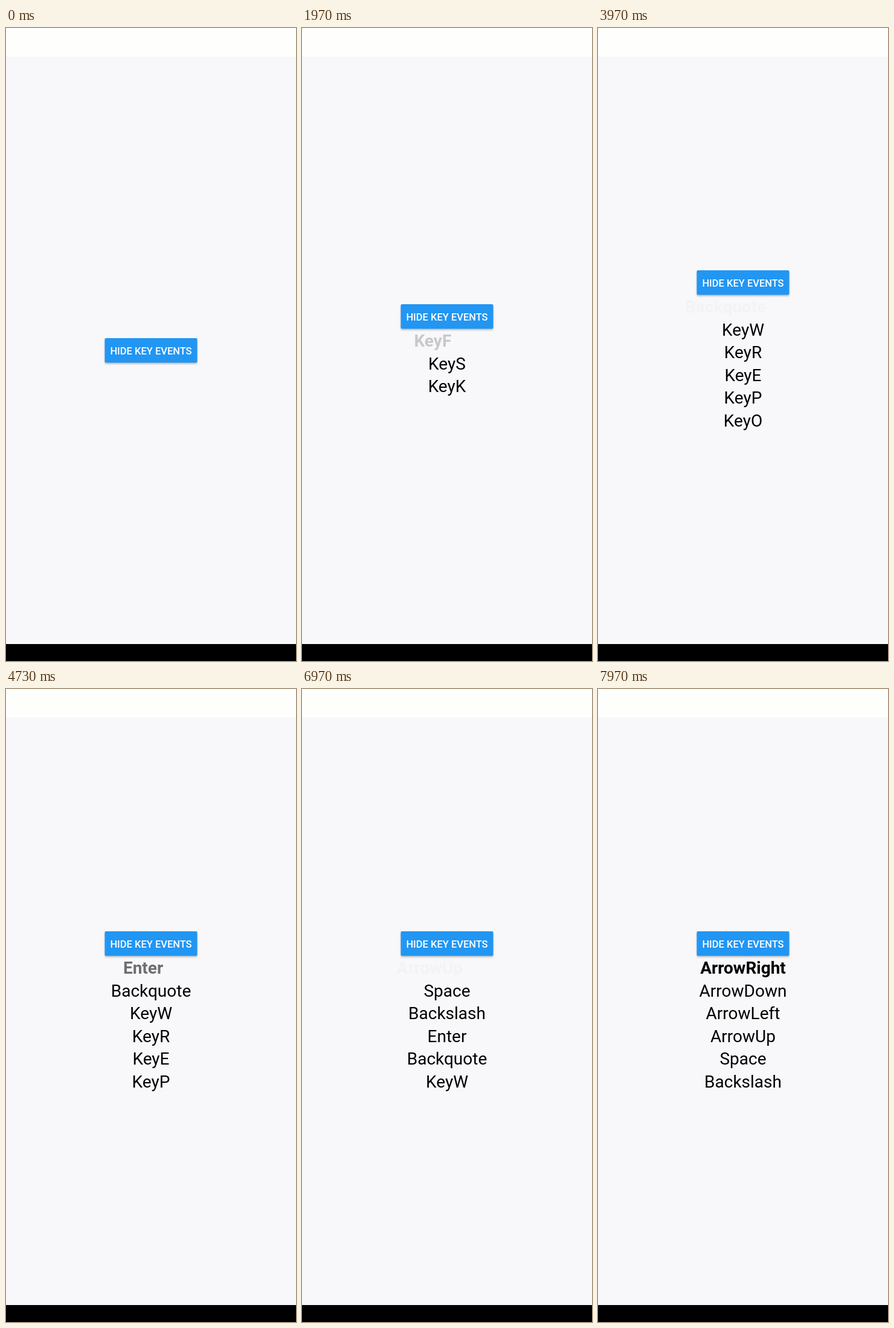
Write an HTML page that moves like this. It is 480 by 1045 pixels and loops after 8.5 s.

```html
<!DOCTYPE html>
<html lang="en">
<head>
<meta charset="utf-8">
<title>Key events</title>
<style>
  html, body { margin: 0; width: 100%; height: 100%; overflow: hidden; background: #f8f8fb; }
  svg { display: block; }
  text { font: 28px Roboto, sans-serif; text-anchor: middle; }
  #button rect { fill: #2196f3; filter: drop-shadow(0 2px 1.5px rgba(0, 0, 0, .26)); }
  #button text { font-size: 16.5px; font-weight: 500; fill: #fff; }
  #rows text:first-child { font-weight: 700; }
</style>
</head>
<body>
<svg width="480" height="1045" viewBox="0 0 480 1045">
  <rect width="480" height="1045" fill="#f8f8fb"/>
  <rect width="480" height="47" fill="#fefefd"/>
  <rect y="1017" width="480" height="28"/>
  <g id="button">
    <rect x="163.5" width="153" height="40.5" rx="2"/>
    <text x="240" y="27">HIDE KEY EVENTS</text>
  </g>
  <g id="rows"></g>
</svg>
<script>
const LOOP = 8500, FPS = 30, MAX_ROWS = 6, ROW = 37.5;
const FADE = 300, LAG = 25, SLIDE = 29.1;

// [key code, tick at which it is pressed]
const presses = [
  ['KeyK', 40], ['KeyS', 51], ['KeyF', 57], ['KeyO', 64],
  ['KeyP', 70], ['KeyE', 76], ['KeyR', 79], ['KeyW', 81],
  ['Backquote', 119], ['Enter', 138], ['Backslash', 153], ['Space', 165],
  ['ArrowUp', 209], ['ArrowLeft', 216], ['ArrowDown', 223], ['ArrowRight', 230]
];

const button = document.getElementById('button');
const holder = document.getElementById('rows');
const rows = Array.from({ length: MAX_ROWS }, () =>
  holder.appendChild(document.createElementNS('http://www.w3.org/2000/svg', 'text')));

const easeInOut = t => t < .5 ? 2 * t * t : 1 - 2 * (1 - t) ** 2;

function draw(ms) {
  const tick = Math.floor((ms + 4) * FPS / 1000);
  const shown = presses.filter(p => p[1] <= tick).slice(-MAX_ROWS).reverse();
  const top = 512 - shown.length * ROW / 2;
  button.setAttribute('transform', `translate(0 ${Math.round(top)})`);

  rows.forEach((row, i) => {
    const [label, start] = shown[i] || ['', 0];
    const age = (tick - start) * 1000 / FPS + LAG;
    const p = i ? 1 : easeInOut(Math.min(1, age / FADE));
    row.textContent = label;
    row.setAttribute('x', 240 - SLIDE * (1 - p));
    row.setAttribute('y', Math.round(top + 70.5 + i * ROW));
    row.setAttribute('opacity', p);
  });
}

const origin = performance.now();
function frame() {
  draw((performance.now() - origin) % LOOP);
  requestAnimationFrame(frame);
}
frame();
</script>
</body>
</html>
```
